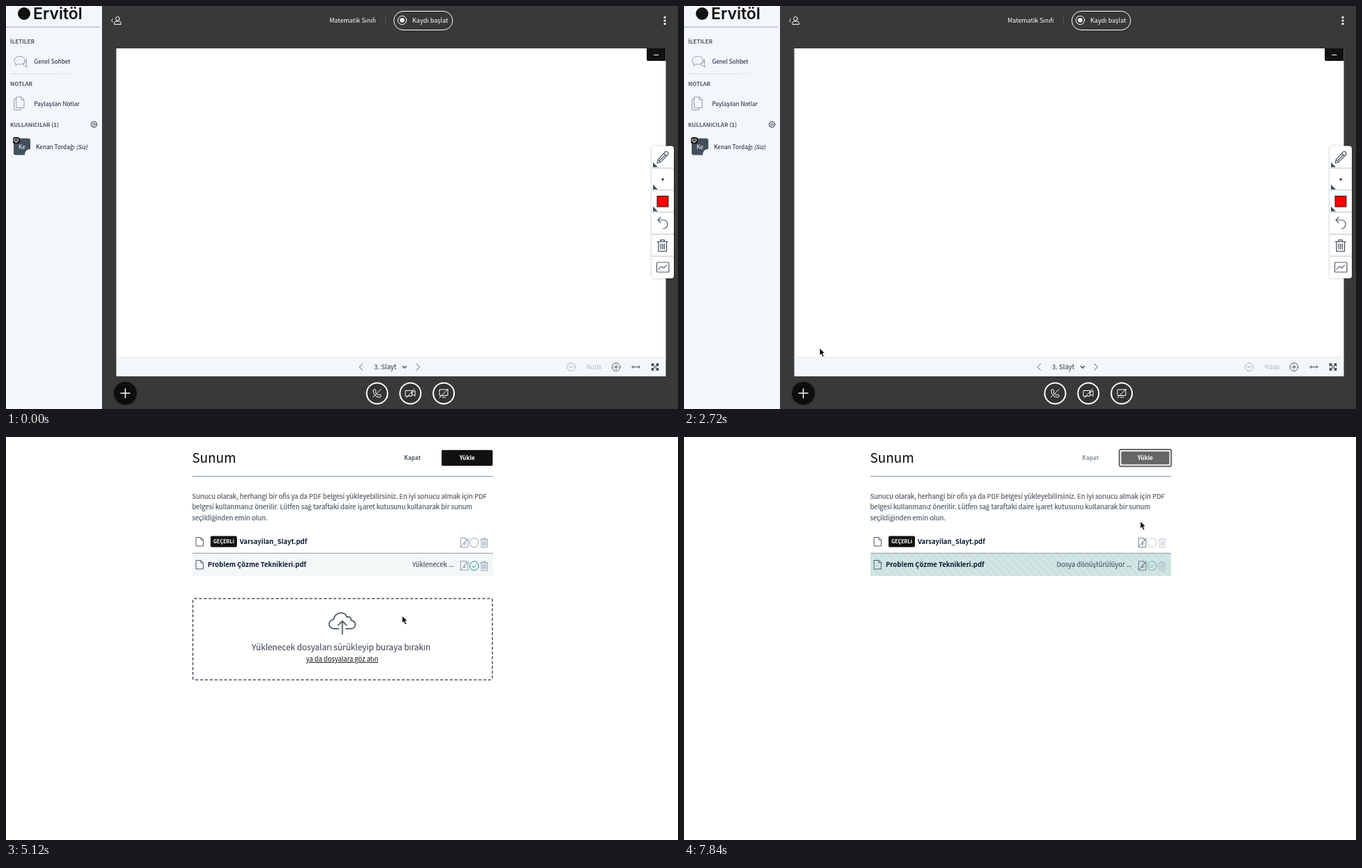
These frames come from a looping animation (966x580 px, 8000 ms). An HTML page:

```html
<!DOCTYPE html>
<html lang="tr">
<head>
<meta charset="utf-8">
<title>Sunum</title>
<style>
html, body { margin: 0; width: 100%; height: 100%; overflow: hidden; background: #fff }
svg { display: block; width: 966px; height: 580px }
text { font: 8.3px "Noto Sans CJK JP", "Noto Sans CJK SC", "Open Sans", sans-serif; fill: #0a1830 }
.tr { font-family: "Open Sans", sans-serif }
.b { font-weight: 700 }
.m { font-weight: 500 }
.w { fill: #fff }
.head { font-size: 8px; font-weight: 700; fill: #4e5a66 }
.big { font-size: 9.5px }
.grey { fill: #4e5a66; stroke: #4e5a66; stroke-width: .2 }
.mid { text-anchor: middle }
.end { text-anchor: end }
.line { fill: none; stroke: #4e5a66; stroke-width: 1; stroke-linecap: round; stroke-linejoin: round }
.soft { stroke: #8494a4; stroke-width: .9 }
.white { stroke: #fff }
.teal { stroke: #008081 }
</style>
</head>
<body>
<svg viewBox="0 0 966 580">
<defs>
  <filter id="shadow" x="-20%" y="-20%" width="140%" height="140%">
    <feDropShadow dx="0" dy="0" stdDeviation="1.6" flood-opacity=".3"/>
  </filter>
  <linearGradient id="fade">
    <stop stop-color="#cdd5de"/><stop offset="1" stop-color="#cdd5de" stop-opacity="0"/>
  </linearGradient>
  <pattern id="stripes" width="7.5" height="9" patternUnits="userSpaceOnUse" patternTransform="rotate(-45)">
    <rect width="7.5" height="9" fill="#cae1e0"/><rect width="3.75" height="9" fill="#d3e6e5"/>
  </pattern>
  <path id="sheet" d="M.5.5h6.5l3.5 3.5v9h-10zM7 .5v3.5h3.5"/>
  <path id="bin" d="M0 2.5h11M3.5 2.5v-2h4v2M1.2 2.5v11h8.6v-11M3.6 5v6M5.5 5v6M7.4 5v6"/>
  <path id="nosheet" d="M1 .5h7l3 3v10H1zM8 .5v3h3M0 13.5L12.5.5M6 5v5M4 8l2 2 2-2"/>
</defs>

<g id="room">
  <path fill="#393939" d="M0 0h966v580H0z"/>
  <path fill="#f3f6fb" d="M0 0h138v580H0z"/>
  <circle cx="26" cy="11" r="9" fill="#111"/>
  <text x="39" y="19" style="font:600 23px Inter,sans-serif;fill:#111">Ervitöl</text>
  <path class="line" style="stroke:#8fa5bd" d="M0 30.3h134"/>
  <text class="head" x="6" y="53.5">İLETILER</text>
  <text class="m" x="40.5" y="83">Genel Sohbet</text>
  <path class="line soft" d="M17 83.5l-3 2.5v-3c-3-2-3-8 2-10 6-2 11 1 11 5 0 5-5 7-10 5.5M29 77c0 3-2 6-5 7 1 2 3 2.500 4 2.5l2 1.5v-2c-1-2 0-5-1-9"/>
  <rect x="6" y="97" width="120" height="1" fill="url(#fade)"/>
  <text class="head" x="6" y="114.5">NOTLAR</text>
  <path class="line soft" d="M15 134h-3.5v15.5h10v-3M15 131h7l4 4v11.5h-11zM22 131v4h4"/>
  <text class="m" x="40.5" y="143.5">Paylaşılan Notlar</text>
  <text class="head" x="6" y="173.5">KULLANICILAR (1)</text>
  <g class="line"><circle cx="126.5" cy="170.5" r="1.6"/><circle cx="126.5" cy="170.5" r="3.8"/><circle cx="126.5" cy="170.5" r="4.6" stroke-dasharray="1.4 2.2"/></g>
  <path fill="#434f5d" d="M14 190.5h18q3 0 3 3v12.5q-8 0-8 8.5H14q-3 0-3-3v-18q0-3 3-3z"/>
  <text class="w mid" x="23" y="205.5">Ke</text>
  <rect x="10" y="189" width="9.5" height="9" rx="2.5" fill="#000"/>
  <path class="line white" d="M12 191.5h5.5v3H12zM13.5 196.3h2.5"/>
  <text class="m" x="43" y="205.5">Kenan Tordağı <tspan font-style="italic" font-weight="400">(Siz)</tspan></text>

  <path class="line white" d="M153.5 18.5l-2 2.3 2 2.3M155.8 26v-1.5q0-2.5 3-2.5h3.5q3 0 3 2.5V26z"/>
  <circle class="line white" cx="160.5" cy="18.3" r="2.8"/>
  <text class="w" x="465" y="24" style="font-size:8.95px">Matematik Sınıfı</text>
  <path class="line" style="stroke:#5a5a5a" d="M545.5 16v9"/>
  <rect class="line white" x="557.5" y="7.5" width="84.5" height="27" rx="13.5"/>
  <circle class="line white" cx="569.5" cy="20.5" r="6.2"/><circle class="w" cx="569.5" cy="20.5" r="3.2"/>
  <text class="w" x="584" y="24" style="font-size:9.1px">Kaydı başlat</text>
  <g class="w"><circle cx="947" cy="16.3" r="1.6"/><circle cx="947" cy="21" r="1.6"/><circle cx="947" cy="25.7" r="1.6"/></g>

  <path fill="#fff" d="M158.5 61h790v445h-790z"/>
  <path fill="#f3f6fb" d="M158.5 505h790v28h-790z"/>
  <path fill="#e3e7ed" d="M158.5 505h790v.8h-790z"/>
  <path fill="#111" d="M921 61h27.5v18H923q-2 0-2-2z"/>
  <path class="line white" d="M931.5 70.5h6.5"/>
  <path class="line" d="M512.5 515l-4.5 4.5 4.5 4.5M590 515l4.5 4.5-4.5 4.5"/>
  <path class="line" style="stroke-width:1.7" d="M570.5 518.5l2.5 2.5 2.5-2.5"/>
  <text class="m big grey" x="529" y="523">3. Slayt</text>
  <g class="line" style="stroke:#a9b2bc"><circle cx="812.5" cy="519.5" r="5.8"/><path d="M810 519.5h5"/></g>
  <text x="834.5" y="523" style="fill:#a3acb7">%100</text>
  <g class="line"><circle cx="877" cy="519.5" r="5.8"/><path d="M874 519.5h6M877 516.5v6M900 519.5h11M902 517.5l-2 2 2 2M909 517.5l2 2-2 2"/></g>
  <path class="line" style="stroke:#222;stroke-width:1.2" d="M928.5 518v-3h3m-3 0l3.5 3.5M937.5 518v-3h-3m3 0l-3.5 3.5M928.5 521v3h3m-3 0l3.5-3.5M937.5 521v3h-3m3 0l-3.5-3.5"/>

  <rect x="928" y="201.5" width="32" height="190.5" rx="4" fill="#fff" filter="url(#shadow)"/>
  <path class="line" style="stroke:#b4c1ce" d="M928.5 233.3h31M928.5 265h31M928.5 296.7h31M928.5 328.4h31M928.5 360.1h31"/>
  <path fill="#434f5d" d="M930 225v7h7zM930 257v7h7zM930 288.5v7h7z"/>
  <path class="line" style="stroke-width:1.2" d="M936 226l1.2-4.8L947.5 210q1.8-1.5 3.7.3 1.8 1.9.3 3.7L940.8 224.8zM937.2 221.2l3.6 3.6M945.5 212.3l3.7 3.7M939 223l9-9"/>
  <circle cx="944" cy="249.5" r="1.5"/>
  <rect x="936" y="273.5" width="16" height="15.5" fill="red" stroke="#222"/>
  <path class="line" style="stroke-width:1.2" d="M941 304l-4 4 4 4M937.5 308h7.5q6 .5 6 6 0 5.5-6 6.5"/>
  <use href="#bin" class="line" transform="translate(936.3 336) scale(1.35 1.26)"/>
  <g class="line" style="stroke-width:1.2"><rect x="935.5" y="369" width="17.5" height="14" rx="1"/><path d="M938.5 379c1-3 3.5-5 5-3s4 0 6-3"/></g>

  <circle cx="171.5" cy="557.5" r="16.5" fill="#111" filter="url(#shadow)"/>
  <circle id="focus" class="line" style="stroke:#444" cx="171.5" cy="557.5" r="15"/>
  <path class="line white" style="stroke-width:1.5" d="M165 557.3h13M171.5 551v13"/>
  <g fill="#333" stroke="#fff" stroke-width="2"><circle cx="533.5" cy="557.5" r="15"/><circle cx="581.3" cy="557.5" r="15"/><circle cx="629.2" cy="557.5" r="15"/></g>
  <g class="line white">
    <path d="M528 553q1-2.5 3-1l1 2-1 2q1.5 3 4 4l2-1 2 1.2q1.2 1.8-1.5 3-5 .5-8-4-2-3-1.5-6.2M539 551.5L527.5 563"/>
    <path d="M574.5 553.5h9v8h-9zM583.5 556.5l4.5-3v8l-4.5-3M587 551l-11.5 13"/>
    <path d="M623.5 552h11.5v8.5h-11.5zM627 563h5M635.5 551l-12.5 13"/>
  </g>
  <g id="tip">
    <rect x="147.5" y="515.5" width="47" height="18" rx="2" fill="#222"/>
    <text class="w" x="153.5" y="527.5" style="font-size:8.4px">Eylemler</text>
  </g>
  <g id="menu">
    <rect x="158" y="452" width="117" height="78" rx="2" fill="#fff" filter="url(#shadow)"/>
    <path fill="#fff" d="M167 529l4.5 5 4.5-5z"/>
    <rect id="hover" x="158" width="117" height="24" fill="#111"/>
    <g id="items"></g>
  </g>
</g>

<g id="modal">
  <path fill="#fff" d="M0 0h966v580H0z"/>
  <text x="267.5" y="37" style="font-size:18.9px;fill:#0a0a0a">Sunum</text>
  <text id="close" class="b mid" x="584.3" y="33.3" style="fill:#4e5a66">Kapat</text>
  <rect id="ring" x="625.8" y="18" width="74.6" height="24.2" rx="2.5" fill="#fff" stroke="#666" stroke-width="2"/>
  <rect id="button" rx="1.5"/>
  <text id="action" class="b mid" x="663" y="33.3"></text>
  <path fill="#8fa0b1" d="M268 56h432v1.3H268z"/>
  <text class="big grey" x="267.5" y="89.3">Sunucu olarak, herhangi bir ofis ya da PDF belgesi yükleyebilirsiniz. En iyi sonucu almak için PDF</text>
  <text class="big grey" x="267.5" y="104.4">belgesi kullanmanız önerilir. Lütfen sağ taraftaki daire işaret kutusunu kullanarak bir sunum</text>
  <text class="big grey" x="267.5" y="119.5">seçildiğinden emin olun.</text>
  <use href="#sheet" class="line" x="273" y="144"/>
  <rect x="294" y="142.5" width="38" height="16" rx="2" fill="#111"/>
  <text class="b w mid" x="313" y="153.3" style="font-size:7.2px">GEÇERLİ</text>
  <text class="b big" x="336" y="153.5">Varsayilan_Slayt.pdf</text>
  <use href="#nosheet" class="line soft sheets" x="653" y="145"/>
  <g class="line soft faded"><circle id="pick" cx="673" cy="152.2" r="6.5"/><use href="#bin" x="682" y="145.3"/></g>
  <path id="tick" class="line teal" d="M670 152.5l2.2 2.2 3.8-4.4"/>
  <g id="added">
    <rect id="row" x="268" y="167.5" width="432" height="32.5"/>
    <path fill="#8b98a5" d="M268 166.8h432v1H268z"/>
    <use href="#sheet" class="line" x="273" y="177"/>
    <text class="b big" x="290" y="186.7">Problem Çözme Teknikleri.pdf</text>
    <text id="status" class="big grey end" x="644" y="186.7"></text>
    <use href="#nosheet" class="line soft sheets" x="653" y="178.3"/>
    <g class="line soft faded"><g class="teal"><circle cx="673" cy="185.5" r="6.5"/><path d="M670 185.8l2.2 2.2 3.8-4.4"/></g><use href="#bin" x="682" y="178.6"/></g>
  </g>
  <g id="drop">
    <rect id="zone" x="268.6" y="199" width="430.6" height="117" rx="2" stroke="#434f5d" stroke-width="1.5" stroke-dasharray="4.2 2.7"/>
    <path class="line" style="stroke-width:1.8" d="M478 242.5h-6.5c-4 0-7-3-7-6.5s2.5-6.2 6-6.5c1-6 6-9.8 11-9.8 4.500 0 7.300 2.300 8.500 6 3.500-1.400 6.500 1.300 6.300 5.100 3.500.3 5.700 2.600 5.700 5.700 0 3.500-2.700 6-6.200 6H489M483.500 250v-18M477.500 237.500l6-6 6 6"/>
    <text class="mid grey" x="481.8" y="273.3" style="font-size:11.85px">Yüklenecek dosyaları sürükleyip buraya bırakın</text>
    <text class="mid" x="483.3" y="289.5" style="font-size:9.4px;fill:#111;text-decoration:underline">ya da dosyalara göz atın</text>
  </g>
</g>

<g id="cursor">
  <g id="press"><circle r="13" fill="#fff" fill-opacity=".12" stroke="#fff" stroke-width="2.2"/><circle r="12.5" fill="none" stroke="#222"/></g>
  <path id="arrow" stroke="#fff" stroke-width=".8" d="M0 0v10.3l2.3-2.1 1.9 4.2 2-.9-1.9-4.1 3.2-.2z"/>
  <path id="hand" stroke="#fff" stroke-width=".9" d="M-1 0q1.2-.9 2 .3v4l1.2-.3 1 .7 1.3-.2.9.8 1 .2q.5 3-.6 5v2h-6q-1-2.4-3.3-4.5-.3-1.8 1.2-1.2l1.300 1z"/>
  <g id="deny"><circle cx="7" cy="17.5" r="6" fill="#eee" stroke="#888" stroke-width="1.6"/><path d="M2.8 13.3l8.4 8.4" stroke="#888" stroke-width="1.6"/></g>
  <g id="drag">
    <circle cx="45" cy="34" r="7.5" fill="#ececec"/><rect x="41.5" y="28.5" width="7" height="7.5" rx="1" fill="#222"/>
    <path class="line white" style="stroke-width:.8" d="M43.5 34l1.5-3.5 1.5 3.5z"/>
    <rect x="51" y="27" width="136.5" height="11.5" rx="4" fill="#7f9fe8"/>
    <text class="w" x="53.3" y="36" style="font:500 8.85px Inter,sans-serif">Problem Çözme Teknikleri.pdf</text>
    <circle cx="7.5" cy="14.5" r="7" fill="#22a318"/><path class="line white" style="stroke-width:1.6" d="M4 14.5h7M7.5 11v7"/>
  </g>
</g>
</svg>
<script>
const LOOP = 8000, STEP = 80;
const $ = id => document.getElementById(id);
const show = (id, on) => $(id).style.display = on ? '' : 'none';
const set = (id, attrs) => { for (const k in attrs) $(id).setAttribute(k, attrs[k]); };

// These letters need a font that has them precomposed
const turkish = s => s.replace(/[İĞğŞş]/g, '<tspan class="tr">$&</tspan>');

// time, x, y, pointer from that time on
const path = [
  [0, 472, 564, ''], [80, 472, 564, 'arrow'], [240, 472, 564, 'arrow'], [640, 330, 519, 'arrow'],
  [1040, 177, 568, 'hand'], [1120, 170.5, 561, 'hand'], [1680, 170.5, 561, 'hand'],
  [2400, 195, 498, 'hand'], [2480, 195, 492.5, 'hand'], [2640, 195, 492.5, 'arrow'],
  [3120, 195, 492.5, 'arrow'], [3360, 674, 408, 'arrow'], [3440, 674, 408, ''],
  [4800, 772.5, 287, 'drag'], [4960, 569.5, 257.5, 'drag'], [5120, 569.5, 257.5, 'arrow'],
  [5200, 602, 264, 'arrow'], [5360, 604, 265, 'arrow'], [5440, 604, 265, 'arrow'],
  [5600, 612, 291, 'arrow'], [6080, 655, 40, 'hand'], [6160, 655, 37, 'hand'],
  [6400, 655, 37, 'deny'], [6720, 655, 37, 'arrow'], [7120, 667, 168, 'deny'],
  [7280, 667, 168, 'deny'], [7440, 685, 175, 'deny'], [7520, 685, 175, 'arrow'],
  [7840, 656, 121.5, 'arrow'], [LOOP, 656, 121.5, '']
];

const items = ['Oylama başlat', 'Sunum yükle', 'Dış video paylaş'].map((label, i) => {
  const g = document.createElementNS('http://www.w3.org/2000/svg', 'g');
  g.innerHTML = `<rect x="165" y="${461 + i * 24}" width="9" height="9" rx="1" fill="none"/><text x="180" y="${469 + i * 24}">${label}</text>`;
  return $('items').appendChild(g);
});

function drawCursor(t) {
  const i = path.findLastIndex(k => k[0] <= t);
  const [t0, x0, y0, kind] = path[i], [t1, x1, y1] = path[i + 1];
  const u = (t - t0) / (t1 - t0), e = u * u * (3 - 2 * u);
  set('cursor', { transform: `translate(${x0 + (x1 - x0) * e} ${y0 + (y1 - y0) * e})` });
  show('cursor', kind);
  show('arrow', kind != 'hand');
  for (const id of ['hand', 'deny', 'drag']) show(id, kind == id);
  const clicking = [1520, 2560, 6320].some(c => t >= c && t < c + STEP);
  show('press', clicking || kind == 'drag');
  set('press', { transform: kind == 'drag' ? 'translate(7.5 10.5)' : 'translate(1.5 6)' });
}

function drawRoom(t) {
  show('tip', t >= 1280 && t < 1600);
  show('focus', t >= 1360 && t < 2640);
  show('menu', t >= 1600 && t < 2640);
  const hot = t < 2240 ? -1 : t < 2400 ? 2 : 1;
  show('hover', hot >= 0);
  set('hover', { y: 454 + hot * 24 });
  items.forEach((g, i) => {
    const color = i == hot ? '#fff' : '#4e5a66';
    g.firstChild.style.stroke = g.lastChild.style.fill = color;
  });
}

function drawModal(t) {
  const added = t >= 5120, busy = t >= 6400;
  show('added', added);
  show('tick', !added);
  show('drop', !busy);
  show('ring', busy);
  set('drop', { transform: `translate(0 ${added ? 33.4 : 0})` });
  $('zone').style.fill = t >= 4880 && !added ? '#e4e8ec' : '#fff';
  $('pick').style.stroke = added ? '' : '#008081';
  set('button', busy
    ? { x: 628.5, y: 20.8, width: 69.2, height: 18.7, fill: '#666' }
    : { x: 626.2, y: 18.8, width: 73.4, height: 22.8, fill: '#111' });
  $('action').textContent = added ? 'Yükle' : 'Onayla';
  $('action').style.fill = busy && t < 6800 ? '#aaa' : '#fff';
  $('close').style.opacity = busy ? .65 : 1;
  set('row', { fill: busy ? 'url(#stripes)' : '#f3f7f8' });
  $('status').innerHTML = turkish(busy ? 'Dosya dönüştürülüyor ...' : 'Yüklenecek ...');
  document.querySelectorAll('.faded').forEach(g => g.style.opacity = busy ? .5 : 1);
  document.querySelectorAll('.sheets').forEach(g => g.style.stroke = busy ? '#65788a' : '');
}

function draw() {
  const t = Math.floor(performance.now() % LOOP / STEP) * STEP;
  show('room', t < 2800);
  show('modal', t >= 2800);
  drawRoom(t);
  drawModal(t);
  drawCursor(t);
  requestAnimationFrame(draw);
}

document.querySelectorAll('text').forEach(el => el.innerHTML = turkish(el.innerHTML));
draw();
</script>
</body>
</html>
```
